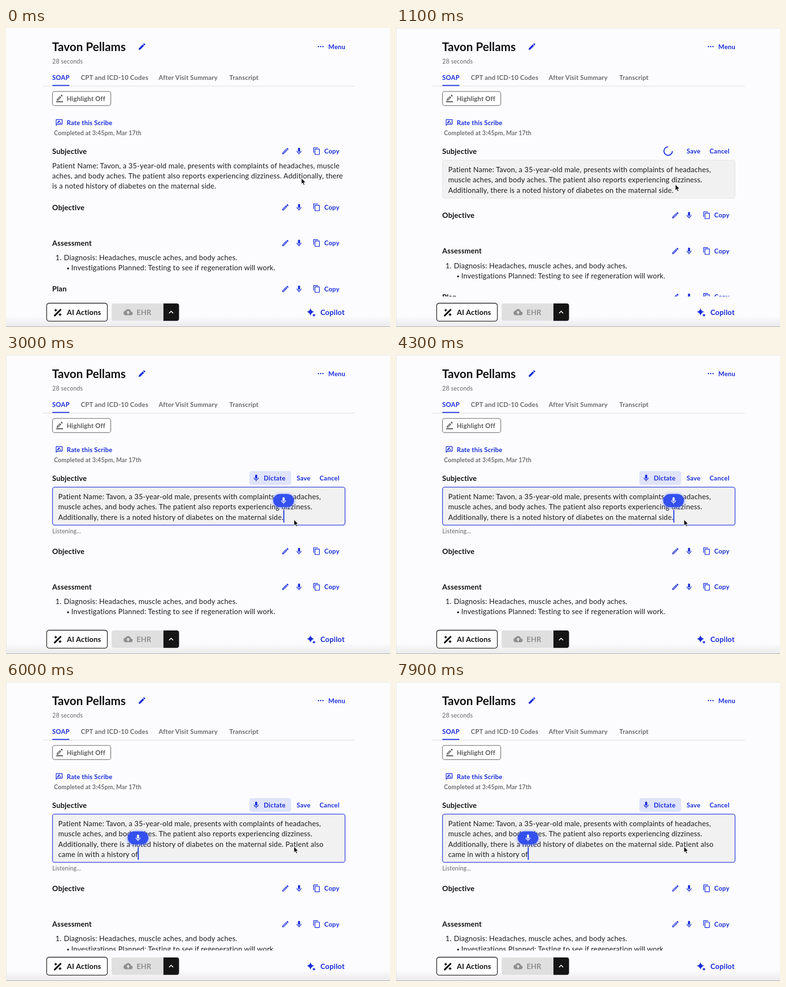
Animation, 800 px wide and 622 px high, one loop 8 s. Source, as an HTML page:

```html
<!DOCTYPE html>
<html lang="en">
<head>
<meta charset="utf-8">
<title>Visit note dictation</title>
<style>
  html, body { margin: 0; width: 100%; height: 100%; overflow: hidden; background: #fcfcfe; }
  svg { display: block; width: 800px; height: 622px; font-family: Lato, "Open Sans", sans-serif; }
  text { white-space: pre; }
  .title { font-size: 24.4px; font-weight: 700; fill: #111; }
  .small { font-size: 12.43px; letter-spacing: .18px; fill: #666; }
  .tab { font-size: 13.3px; font-weight: 700; letter-spacing: .22px; fill: #6b6b6b; }
  .action { font-size: 13.3px; font-weight: 700; letter-spacing: .28px; fill: #1a2edb; }
  .head { font-size: 15.2px; font-weight: 700; letter-spacing: .2px; fill: #111; }
  .body { font-size: 15px; letter-spacing: .21px; fill: #1d1d1f; }
  .blue { fill: #1a2edb; }
  .bold { font-weight: 700; }
</style>
</head>
<body>
<svg viewBox="0 0 800 622" xmlns="http://www.w3.org/2000/svg">
  <defs>
    <path id="pencil" d="M3 17.25V21h3.75L17.81 9.94l-3.75-3.75zM20.71 7.04a1 1 0 000-1.41l-2.34-2.34a1 1 0 00-1.41 0l-1.83 1.83 3.75 3.75z"/>
    <path id="edit" d="M14.06 9.02l.92.92L5.92 19H5v-.92l9.06-9.06M17.66 3c-.25 0-.51.1-.7.29l-1.83 1.83 3.75 3.75 1.83-1.83a1 1 0 000-1.41l-2.34-2.34c-.2-.2-.45-.29-.71-.29zm-3.6 3.19L3 17.25V21h3.75L17.81 9.94z"/>
    <path id="mic" d="M12 14c1.66 0 3-1.34 3-3V5c0-1.66-1.34-3-3-3S9 3.34 9 5v6c0 1.66 1.34 3 3 3zM17 11c0 2.76-2.24 5-5 5s-5-2.24-5-5H5c0 3.53 2.61 6.43 6 6.92V21h2v-3.08c3.39-.49 6-3.39 6-6.92z"/>
    <path id="copy" d="M16 1H4c-1.1 0-2 .9-2 2v14h2V3h12zm3 4H8c-1.1 0-2 .9-2 2v14c0 1.1.9 2 2 2h11c1.1 0 2-.9 2-2V7c0-1.1-.9-2-2-2zm0 16H8V7h11z"/>
    <path id="marker" d="M16.81 8.94l-3.75-3.75L4 14.25V18h3.75zM6 16v-.92l7.06-7.06.92.92L6.92 16zM20.71 5.04a1 1 0 000-1.41l-2.34-2.34a1 1 0 00-1.41 0l-1.83 1.83 3.75 3.75zM2 20h20v3H2z"/>
    <path id="review" d="M20 2H4c-1.1 0-2 .9-2 2v18l4-4h14c1.1 0 2-.9 2-2V4c0-1.1-.9-2-2-2zm0 14H5.17L4 17.17V4h16zM6 14h2.5l5.9-5.9-2.5-2.5L6 11.5zM12 14h6v-2h-4z"/>
    <path id="cloud" d="M19.35 10.04C18.67 6.59 15.64 4 12 4 9.11 4 6.6 5.64 5.35 8.04 2.34 8.36 0 10.91 0 14c0 3.31 2.69 6 6 6h13c2.76 0 5-2.24 5-5 0-2.64-2.05-4.78-4.65-4.96zM14 13v4h-4v-4H7l5-5 5 5z"/>
    <path id="star" d="M0-10Q2-2 10 0Q2 2 0 10Q-2 2-10 0Q-2-2 0-10z"/>
    <clipPath id="scroller"><rect y="122" width="800" height="436.5"/></clipPath>
    <filter id="glow" x="-50%" y="-60%" width="200%" height="220%"><feGaussianBlur stdDeviation="3"/></filter>
    <linearGradient id="shade" x2="0" y2="1">
      <stop stop-color="#000" stop-opacity="0"/><stop offset="1" stop-color="#000" stop-opacity=".075"/>
    </linearGradient>
  </defs>
  <rect width="800" height="622" fill="#fcfcfe"/>
  <g id="header"></g>
  <g clip-path="url(#scroller)">
    <g id="intro"></g>
    <g id="reading"></g>
    <g id="editing">
      <rect id="field" x="96.9" y="274.9" width="609.5" rx="4.5" fill="#f1f1f1" stroke-width="1.3"/>
      <g id="note"></g>
      <text id="listening" class="small" x="96.5">Listening...</text>
    </g>
    <g id="sections"></g>
  </g>
  <g id="spinner"><path d="M567 247.3a8.8 8.8 0 1 0 8.8 8.8" fill="none" stroke="#1a2edb" stroke-width="2.1"/></g>
  <g id="dictate"><rect x="507" y="241.5" width="87" height="28.5" rx="4.5" fill="#dfe3fb"/></g>
  <g id="footer"></g>
  <g id="voice">
    <rect x="-22" y="-47" width="44" height="28" rx="14" fill="#5a74ff" opacity=".75" filter="url(#glow)"/>
    <rect x="-21.5" y="-47.5" width="43" height="27" rx="13.5" fill="#3450ee"/>
    <rect id="caret" x="-.6" y="-14.5" width="2.2" height="26.5" rx="1" fill="#2440e0"/>
  </g>
  <path id="pointer" d="M0 0v12.4l2.8-2.6 2 4.5 2.1-.9-2-4.4h3.9z" fill="#000" stroke="#fff" stroke-width=".9"/>
  <g id="edge" fill="#e3e3e6"><rect width="800" height="1"/><rect width="1" height="622"/></g>
</svg>
<script>
const LOOP = 8000, FRAME = 100;
const EDIT_AT = 800, DICTATE_AT = 1700, TYPE_AT = 5180, CHAR_MS = 20;
const LINE = 21.35;
const TYPED = " Patient also came in with a history of";
const WRAP = TYPED.indexOf(" came");
const $ = id => document.getElementById(id);

function add(parent, tag, attrs, content) {
  const node = document.createElementNS("http://www.w3.org/2000/svg", tag);
  for (const key in attrs) node.setAttribute(key, attrs[key]);
  if (content) node.textContent = content;
  parent.appendChild(node);
  return node;
}
const label = (parent, cls, x, y, content, fill) =>
  add(parent, "text", { class: cls, x, y, ...(fill && { style: `fill:${fill}` }) }, content);
// Icons live on a 24-unit grid and are placed by its centre.
const icon = (parent, name, x, y, scale, fill = "#1a2edb") =>
  add(parent, "use", { href: "#" + name, fill, transform: `translate(${x} ${y}) scale(${scale}) translate(-12 -12)` });
const star = (parent, x, y, r, fill) =>
  add(parent, "use", { href: "#star", fill, transform: `translate(${x} ${y}) scale(${r / 10})` });

function tools(parent, y) {
  icon(parent, "edit", 582, y, .72);
  icon(parent, "mic", 610.5, y + .3, .73);
  icon(parent, "copy", 647.2, y, .71);
  label(parent, "action", 663, y + 4.9, "Copy");
}

function buildHeader() {
  const g = $("header");
  label(g, "title", 96, 47.8, "Tavon Pellams");
  icon(g, "pencil", 283.3, 38.6, .75);
  label(g, "small", 96.5, 73.6, "28 seconds");
  [650.9, 655.6, 660.3].forEach(cx => add(g, "circle", { cx, cy: 38.7, r: 1.4, class: "blue" }));
  label(g, "action", 671.5, 43.6, "Menu");
  label(g, "tab", 96.3, 108.4, "SOAP", "#1a2edb");
  label(g, "tab", 156, 108.4, "CPT and ICD-10 Codes");
  label(g, "tab", 318, 108.4, "After Visit Summary");
  label(g, "tab", 465.3, 108.4, "Transcript");
  add(g, "rect", { x: 76, y: 120.4, width: 651, height: 1, fill: "#d9d9dc" });
  add(g, "rect", { x: 96.5, y: 118.5, width: 35.5, height: 2, class: "blue" });
}

function buildContent() {
  const g = $("intro");
  add(g, "rect", { x: 96.8, y: 132, width: 121.4, height: 29.5, rx: 4.5, fill: "#fff", stroke: "#555", "stroke-width": 1.1 });
  icon(g, "marker", 111.6, 146.6, .72, "#555");
  label(g, "tab", 126.5, 151.8, "Highlight Off", "#5a5a5a");
  icon(g, "review", 110.8, 196.8, .7);
  label(g, "action", 126.5, 201.8, "Rate this Scribe").style.letterSpacing = ".2px";
  label(g, "small bold", 100, 222.8, "Completed at 3:45pm, Mar 17th", "#707070");
  label(g, "head", 96.3, 261.6, "Subjective");

  const reading = $("reading");
  tools(reading, 256);
  [
    "Patient Name: Tavon, a 35-year-old male, presents with complaints of headaches, muscle",
    "aches, and body aches. The patient also reports experiencing dizziness. Additionally, there",
    "is a noted history of diabetes on the maternal side."
  ].forEach((line, i) => label(reading, "body", 96.3, 291.5 + i * LINE, line));

  const s = $("sections");
  [["Objective", 373], ["Assessment", 447.3], ["Plan", 542.8]].forEach(([name, y]) => {
    label(s, "head", 96.3, y + 5.6, name);
    tools(s, y);
  });
  label(s, "body", 103, 483, "1.");
  label(s, "body", 120.5, 483, "Diagnosis: Headaches, muscle aches, and body aches.");
  add(s, "circle", { cx: 129.3, cy: 500.3, r: 2, fill: "#1d1d1f" });
  label(s, "body", 136, 504.3, "Investigations Planned: Testing to see if regeneration will work.");
}

function buildFooter() {
  const g = $("footer");
  add(g, "rect", { x: 0, y: 600, width: 800, height: 22, fill: "url(#shade)" });
  add(g, "rect", { x: 0, y: 621, width: 800, height: 1, fill: "#a9a9ac" });
  add(g, "rect", { x: 84.7, y: 572.5, width: 126.5, height: 37.3, rx: 5, fill: "#fff", stroke: "#111", "stroke-width": 1.3 });
  add(g, "path", { d: "M101.5 598.3l9.2-9.2M112.4 587.4l1.2-1.2", stroke: "#111", "stroke-width": 3.6, "stroke-linecap": "round" });
  star(g, 103.6, 587, 3.6, "#111");
  star(g, 112.6, 596.2, 3.6, "#111");
  label(g, "head", 126.8, 597, "AI Actions");
  add(g, "path", { d: "M328 573v36.3h-103.5a4.5 4.5 0 0 1-4.5-4.5v-27.3a4.5 4.5 0 0 1 4.5-4.5z", fill: "#dfdfdf" });
  icon(g, "cloud", 254.4, 591.2, .8, "#8e8e8e");
  label(g, "head", 272, 597, "EHR", "#8e8e8e");
  add(g, "path", { d: "M328 573h28a4.5 4.5 0 0 1 4.5 4.5v27.3a4.5 4.5 0 0 1-4.5 4.5h-28z", fill: "#151515" });
  add(g, "path", { d: "M339.8 593.3l4.2-4.2 4.2 4.2", fill: "none", stroke: "#fff", "stroke-width": 1.7 });
  star(g, 634.3, 590.5, 7.6, "#1a2edb");
  star(g, 641.6, 597.4, 3.4, "#1a2edb");
  label(g, "head", 655, 597, "Copilot", "#1a2edb");
}

buildHeader();
buildContent();
buildFooter();
icon($("dictate"), "mic", 521.2, 256, .73);
label($("dictate"), "action", 537, 260.9, "Dictate");
label($("editing"), "action", 605.5, 260.9, "Save");
label($("editing"), "action", 653.3, 260.9, "Cancel");
icon($("voice"), "mic", 0, -33.8, .72, "#fff");

const noteLines = [
  "Patient Name: Tavon, a 35-year-old male, presents with complaints of headaches,",
  "muscle aches, and body aches. The patient also reports experiencing dizziness.",
  "Additionally, there is a noted history of diabetes on the maternal side.",
  ""
].map((line, i) => label($("note"), "body", 108.7, 300 + i * LINE, line));
const lastSentence = noteLines[2].textContent;

const pointerPath = [[0, 615.4, 312.4], [100, 615.4, 312.4], [600, 583, 256], [850, 583, 256], [1100, 582, 325.5], [1500, 600, 342.5]];

function pointerAt(t) {
  const next = pointerPath.findIndex(p => p[0] > t);
  if (next < 0) return pointerPath[pointerPath.length - 1].slice(1);
  const [t0, x0, y0] = pointerPath[next - 1], [t1, x1, y1] = pointerPath[next];
  const u = (t - t0) / (t1 - t0), k = u * u * (3 - 2 * u);
  return [x0 + (x1 - x0) * k, y0 + (y1 - y0) * k];
}

const move = (node, x, y) => node.setAttribute("transform", `translate(${x} ${y})`);
const show = (node, on) => node.setAttribute("display", on ? "inline" : "none");

function draw(t) {
  const editing = t >= EDIT_AT, dictating = t >= DICTATE_AT;
  const count = Math.max(0, Math.min(TYPED.length, Math.floor((t - TYPE_AT) / CHAR_MS)));
  const wrapped = count > WRAP + 1, extra = wrapped ? LINE : 0;

  show($("edge"), t >= FRAME);
  show($("reading"), !editing);
  show($("editing"), editing);
  show($("spinner"), editing && !dictating);
  show($("dictate"), dictating);
  show($("listening"), dictating);
  show($("voice"), dictating);

  $("spinner").setAttribute("transform", `rotate(${(t - 1100) * .36} 567 256.1)`);
  $("field").setAttribute("height", 78.9 + extra);
  $("field").setAttribute("stroke", dictating ? "#1a2edb" : "#e6e6e8");
  $("listening").setAttribute("y", 370.8 + extra);
  move($("sections"), 0, editing ? (dictating ? 35 + extra : 16.5) : 0);

  noteLines[2].textContent = lastSentence + TYPED.slice(0, wrapped ? WRAP : count);
  noteLines[3].textContent = wrapped ? TYPED.slice(WRAP + 1, count) : "";
  const active = noteLines[wrapped ? 3 : 2];
  if (dictating) move($("voice"), 108.7 + active.getComputedTextLength(), 336.8 + extra);
  show($("caret"), count === 0 || count === TYPED.length);
  move($("pointer"), ...pointerAt(t));
}

function tick() {
  const t = performance.now() % LOOP;
  draw(Math.floor(t / FRAME) * FRAME);
  requestAnimationFrame(tick);
}
tick();
</script>
</body>
</html>
```
